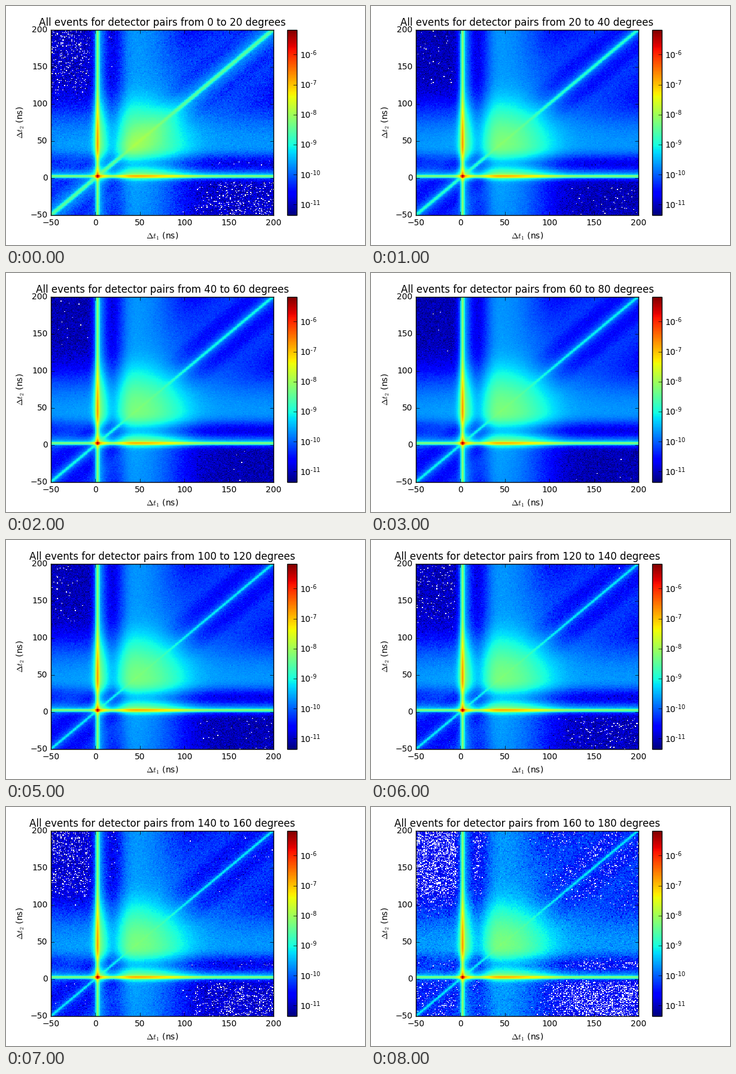
Write a matplotlib script that moves like this. It is 600 by 400 pixels and loops after 9 s.

```python
import numpy as np
import matplotlib.pyplot as plt
from matplotlib.animation import FuncAnimation
from matplotlib.colors import LogNorm

plt.style.use("classic")
plt.rcParams.update({
    "font.size": 10,
    "font.family": "DejaVu Sans",
    "text.kerning_factor": 6,
    "figure.dpi": 100,
    "savefig.dpi": 100,
    "figure.facecolor": "white",
})

LO, HI = -50, 200
BINS = 9
STEP = 20          # degrees per angle bin
FLOOR = 8e-12      # density of uncorrelated pairs


def bell(d, width):
    return np.exp(-0.5 * (d / width) ** 2)


def prompt(t):
    """Gamma flash with a short rise and a longer tail."""
    d = t - 2.6
    return 700 * bell(d, 0.9) + 60 * np.exp(-np.abs(d) / np.where(d < 0, 1.7, 3.6))


def neutron(t):
    """Neutron arrivals: sharp onset, slow fall, faint late tail."""
    d = t - 44
    return 24 * bell(d, np.where(d < 0, 9, 26)) + 0.8 * (d > 0) * np.exp(-d / 40)


t = np.arange(LO, HI) + 0.5
x, y = np.meshgrid(t, t)
gap = np.abs(x - y)
rate = 1 + prompt(t) + neutron(t)
singles = np.outer(rate, rate) - 1
pairs = np.outer(neutron(t), neutron(t))
correlated = 1.5e-12 * neutron(gap) + 1.5e-11 * bell(gap, 50)


def histogram(i):
    # Mean counts per background bin follow the solid angle
    mean = 1.2 + 4.6 * np.sin(np.pi * ((BINS - 1 - i) / 8.6) ** 1.3)
    base = 6e-12 + 1.5e-11 / mean
    forward = np.exp(-i / 0.4)

    density = base + FLOOR * singles + correlated
    density += (6e-10 + 2e-9 * np.exp(-i / 0.8)) * bell(gap, 1.1 + 0.8 * np.exp(-i / 2))
    density += 2.8e-10 * np.exp(-i / 8 - gap / 5)
    density += forward * (1.1e-10 + 0.9 * FLOOR * pairs) * bell(gap, 15)

    unit = base / mean
    counts = np.random.default_rng(i).poisson(density / unit)
    return np.ma.masked_equal(counts, 0) * unit


fig, ax = plt.subplots(figsize=(6, 4))
fig.subplots_adjust(left=0.125, right=0.9, bottom=0.125, top=0.9)
image = ax.imshow(histogram(0), origin="lower", extent=(LO, HI, LO, HI),
                  aspect="auto", interpolation="nearest", cmap="jet",
                  norm=LogNorm(10 ** -11.35, 10 ** -5.175))
ax.set_xticks(range(LO, HI + 1, 50))
ax.set_yticks(range(LO, HI + 1, 50))
ax.set_xlabel(r"$\Delta t_1$ (ns)")
ax.set_ylabel(r"$\Delta t_2$ (ns)")
title = ax.set_title("", fontsize=12)

bar = fig.colorbar(image, ax=ax)
powers = range(6, 12)
bar.set_ticks([10.0 ** -p for p in powers],
              labels=[rf"$\mathdefault{{10^{{{chr(0x2010)}{p}}}}}$" for p in powers])
bar.minorticks_off()


def draw(i):
    image.set_data(histogram(i))
    title.set_text(f"All events for detector pairs from {i * STEP} to {(i + 1) * STEP} degrees")
    return image, title


anim = FuncAnimation(fig, draw, frames=BINS, interval=1000, repeat=True, repeat_delay=0)
plt.show()
```
